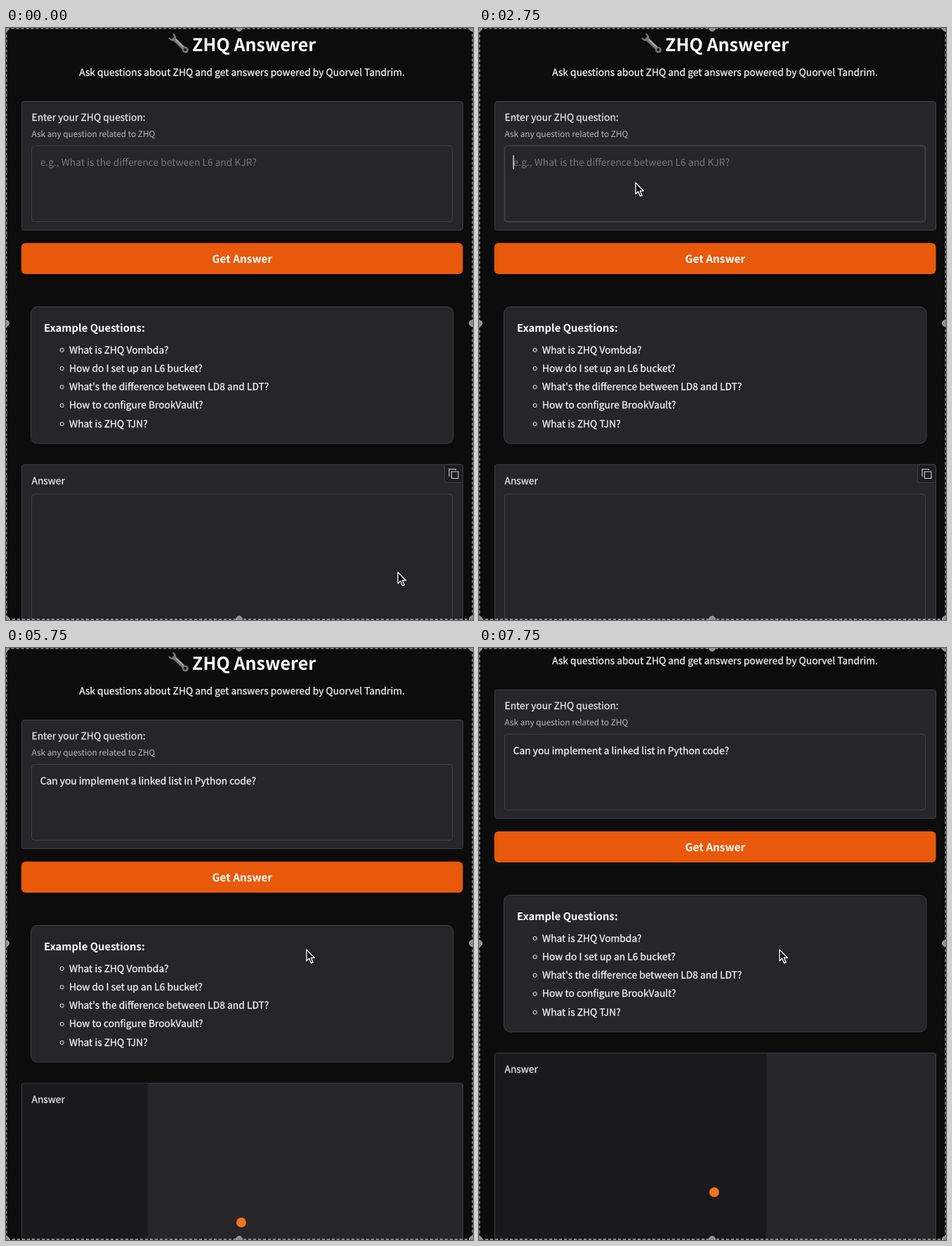
An HTML page that plays this animation: 665 px wide and 842 px high, repeating every 8 s.

```html
<!DOCTYPE html>
<html lang="en">
<head>
<meta charset="utf-8">
<title>Question form</title>
<style>
  html, body { margin: 0; width: 100%; height: 100%; overflow: hidden; background: #0c0c0d; }
  svg { display: block; }
  text {
    font: 13.82px "Noto Sans CJK SC", "Noto Sans CJK JP", "Noto Sans CJK", "Open Sans", sans-serif;
    fill: #f6f6f7; stroke: #f6f6f7; stroke-width: .25px; white-space: pre;
    text-rendering: geometricPrecision;
  }
  .bold { font-weight: 700; stroke: none; fill: #fff; }
  .title { font-size: 25.1px; }
  .button-label { font-size: 15.35px; }
  .heading { font-size: 14.8px; }
  .mid { text-anchor: middle; }
  .label { fill: #e6e6e9; stroke: #e6e6e9; }
  .info { font-size: 11.81px; fill: #b8b8bd; stroke: none; }
  .placeholder { fill: #77777c; stroke: none; }
  .panel { fill: #262629; stroke: #414146; }
  .icon { fill: none; stroke: #d4d4d8; stroke-width: 1.1; }
</style>
</head>
<body>
<svg width="665" height="842" viewBox="0 0 665 842">
  <rect width="665" height="842" fill="#0c0c0d"/>
  <g id="page">
    <g transform="translate(246 22) rotate(44) scale(.88)">
      <path d="M-9 -3H11A5 5 0 1 1 11 3H-9A7 7 0 0 1 -19 4.5L-13 2.5V-2.5L-19 -4.5A7 7 0 0 1 -9 -3Z" fill="#77797b"/>
      <path d="M-8 -1.4H9" stroke="#b4b6b8" stroke-width="1.6"/>
      <circle cx="14.5" r="2.2" fill="#151516"/>
    </g>
    <text class="bold title" x="265" y="32.5">ZHQ Answerer</text>
    <text class="mid" x="336" y="67.5">Ask questions about ZHQ and get answers powered by Quorvel Tandrim.</text>

    <rect class="panel" x="22.5" y="104.5" width="628" height="183" rx="3"/>
    <text class="label" x="36.5" y="132">Enter your ZHQ question:</text>
    <text class="info" x="36.5" y="154.7">Ask any question related to ZHQ</text>
    <rect class="panel" id="input" x="36.5" y="167.5" width="599" height="108" rx="4"/>
    <text id="question" x="48.7" y="196"></text>
    <rect id="caret" x="48.5" y="181" width="1.2" height="20" fill="#fff"/>

    <rect id="button" x="21.8" y="305.8" width="628.8" height="44.2" rx="6"/>
    <text class="bold button-label mid" x="336.3" y="334.2">Get Answer</text>

    <rect class="panel" x="35.5" y="396.5" width="601.5" height="194.5" rx="9"/>
    <text class="bold heading" x="54" y="431.7">Example Questions:</text>
    <g id="examples"></g>

    <rect class="panel" x="22.5" y="621" width="628" height="400" rx="3"/>
    <g id="idle">
      <rect class="panel" x="36.5" y="663" width="599" height="340" rx="4"/>
      <rect x="624.5" y="621" width="26" height="25.5" rx="3" fill="#1e1e21" stroke="#414146"/>
      <path class="icon" d="M634.5 631H644V640.5H634.5ZM632.5 637H631V627.5H640.5V629"/>
    </g>
    <g id="loading">
      <rect id="progress" x="23" y="621.5" height="400" fill="#1a1a1c"/>
      <circle cx="335" cy="819" r="7" fill="#f0731f"/>
    </g>
    <text class="label" x="36.5" y="648.7">Answer</text>
  </g>

  <rect x=".5" y=".5" width="664" height="840.5" fill="none" stroke="#8b8b8d" stroke-width="2" stroke-dasharray="4 3"/>
  <g id="handles" fill="#8f8f91" stroke="#b9b9bb"></g>
  <path id="cursor" d="M0 0V16L3.7 12.6 6.6 19.2 9.2 18.1 6.4 11.7H11.4Z" fill="#111" stroke="#fff" stroke-width="1.3" stroke-linejoin="round"/>
</svg>
<script>
const $ = id => document.getElementById(id);
const LOOP = 8000, STEP = 250;
const FOCUS = 2500, PASTE = 3250, SUBMIT = 4000;
const PLACEHOLDER = "e.g., What is the difference between L6 and KJR?";
const QUESTION = "Can you implement a linked list in Python code?";
const EXAMPLES = [
  "What is ZHQ Vombda?",
  "How do I set up an L6 bucket?",
  "What's the difference between LD8 and LDT?",
  "How to configure BrookVault?",
  "What is ZHQ TJN?"
];

// Rows of time, then values
const POINTER = [
  [0, 558, 774], [250, 480, 610], [500, 358, 350], [750, 344, 331],
  [1250, 344, 331], [1500, 320, 300], [2000, 240, 235], [2500, 223, 220],
  [3250, 223, 220], [3750, 325, 322], [4000, 344, 331], [5000, 346, 334],
  [5250, 353, 354], [5500, 400, 400], [5750, 428, 429]
];
const SCROLL = [[5500, 0], [5750, 2], [6000, 13], [6250, 43], [6500, 45]];

function track(rows, t) {
  const next = rows.findIndex(row => row[0] > t);
  if (next < 0) return rows[rows.length - 1].slice(1);
  if (next === 0) return rows[0].slice(1);
  const a = rows[next - 1], b = rows[next];
  const k = (t - a[0]) / (b[0] - a[0]);
  return a.slice(1).map((v, i) => v + (b[i + 1] - v) * k);
}

const show = (id, on) => $(id).setAttribute("visibility", on ? "visible" : "hidden");
const set = (id, attrs) => {
  for (const name in attrs) $(id).setAttribute(name, attrs[name]);
};

$("examples").innerHTML = EXAMPLES.map((line, i) => {
  const y = 462.5 + 26.3 * i;
  return `<circle cx="79.7" cy="${y - 4.5}" r="2.6" fill="none" stroke="#f6f6f7"/>
    <text x="90" y="${y}">${line}</text>`;
}).join("");

for (const x of [0, 332, 664])
  for (const y of [0, 420, 841])
    if (x !== 332 || y !== 420)
      $("handles").innerHTML += `<circle cx="${x}" cy="${y}" r="4.3"/>`;

function draw(now) {
  const t = Math.floor(now % LOOP / STEP) * STEP;
  const [x, y] = track(POINTER, t);
  const [scroll] = track(SCROLL, t);
  const focused = t >= FOCUS && t < SUBMIT;
  const pasted = t >= PASTE;
  const loading = t >= SUBMIT;

  set("cursor", { transform: `translate(${x} ${y})` });
  set("page", { transform: `translate(0 ${-scroll})` });
  set("button", { fill: y > 306 && y < 355 ? "#c2410c" : "#e8590c" });
  set("input", { "stroke-width": focused ? 2 : 1 });
  set("question", { class: pasted ? "" : "placeholder" });
  $("question").textContent = pasted ? QUESTION : PLACEHOLDER;
  set("caret", { x: pasted ? 49 + $("question").getComputedTextLength() : 48.5 });
  show("caret", focused);
  show("idle", !loading);
  show("loading", loading);
  set("progress", { width: Math.max(0, 127 + (t - 5250) * 0.1036) });
}

const start = performance.now();
function tick() {
  draw(performance.now() - start);
  requestAnimationFrame(tick);
}
tick();
</script>
</body>
</html>
```
